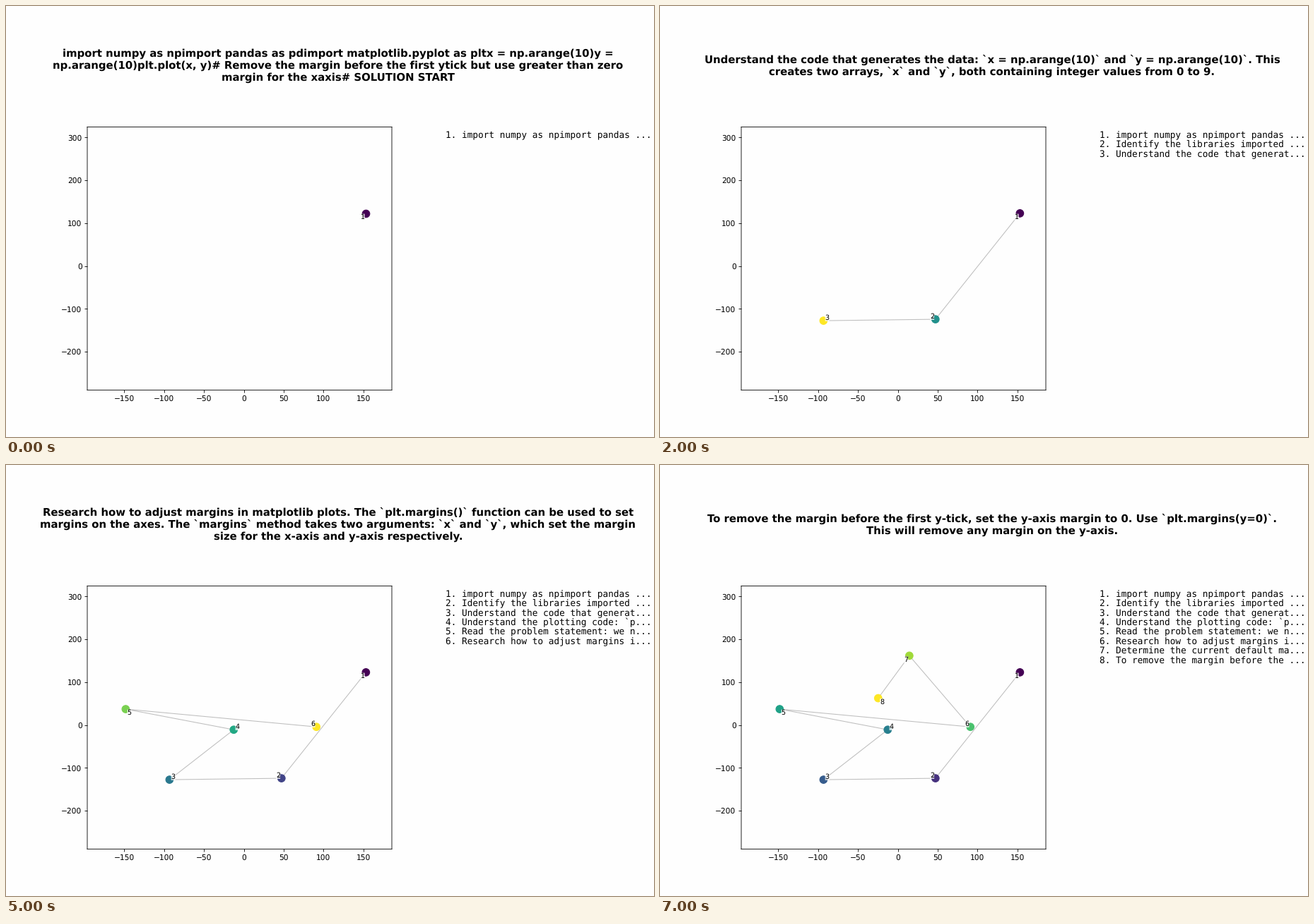
A matplotlib script that plays this animation: 917 by 611 pixels, repeating every 8000 ms.

```python
import matplotlib.pyplot as plt
import numpy as np
from matplotlib.animation import FuncAnimation

W, H, DPI = 917, 611, 76.4
EPS = 1e-6  # keeps the pixel size from rounding down
PAPER = "#fefefe"

# Soft, unsnapped lines and letters
plt.rcParams.update({"path.snap": False, "text.hinting": "none",
                     "figure.facecolor": PAPER, "axes.facecolor": PAPER})

TITLES = [
    "import numpy as npimport pandas as pdimport matplotlib.pyplot as pltx = np.arange(10)y =\n"
    "np.arange(10)plt.plot(x, y)# Remove the margin before the first ytick but use greater than zero\n"
    "margin for the xaxis# SOLUTION START",
    "Identify the libraries imported in the code. The code imports numpy as np, pandas as pd, and\n"
    "matplotlib.pyplot as plt. These are commonly used libraries for numerical and data manipulation and\n"
    "visualization in Python.",
    "Understand the code that generates the data: `x = np.arange(10)` and `y = np.arange(10)`. This\n"
    "creates two arrays, `x` and `y`, both containing integer values from 0 to 9.",
    "Understand the plotting code: `plt.plot(x, y)`. This line of code plots the values of `x`\n"
    "on the x-axis and the values of `y` on the y-axis.",
    "Read the problem statement: we need to remove the margin before the first y-tick but ensure there is\n"
    "a greater than zero margin for the x-axis.",
    "Research how to adjust margins in matplotlib plots. The `plt.margins()` function can be used to set\n"
    "margins on the axes. The `margins` method takes two arguments: `x` and `y`, which set the margin\n"
    "size for the x-axis and y-axis respectively.",
    "Determine the current default margins. By default, matplotlib adds a small margin to both sides\n"
    "of the x-axis and the y-axis.",
    "To remove the margin before the first y-tick, set the y-axis margin to 0. Use `plt.margins(y=0)`.\n"
    "This will remove any margin on the y-axis.",
]
TITLE_MID, TITLE_STEP = 88.9, 17
LIST_X, LIST_TOP, LIST_STEP = 621.8, 187, 13.43

NODES = np.array([(153.2, 123), (47.2, -124.4), (-93.3, -127.7), (-12.7, -11),
                  (-148.3, 37.1), (91, -4.4), (14.4, 161.8), (-24.7, 62.6)])

# Direction in which each number is pushed away from its node (right, down)
SIDES = [(-1, 1), (-1, -1), (1, -1), (1, -1), (1, 1), (-1, -1), (-1, 1), (1, 1)]

fig = plt.figure(figsize=((W + EPS) / DPI, (H + EPS) / DPI), dpi=DPI)
left, right, top, bottom = 115, 546, 171.5, 544.4
ax = fig.add_axes([left / W, 1 - bottom / H, (right - left) / W, (bottom - top) / H])
ax.set_xlim(-196.5, 185.7)
ax.set_ylim(-289.6, 324.6)
ax.set_xticks(range(-150, 151, 50))
ax.set_yticks(range(-200, 301, 100))

path, = ax.plot([], [], color="gray", alpha=0.5, lw=1, zorder=1)
dots = ax.scatter([], [], s=100, zorder=2)
title = [fig.text(0.5125, 0, "", size=14, weight="bold", ha="center") for _ in range(3)]


def number(i):
    right, down = SIDES[i]
    shift = np.array([5 * right + 0.3, -4.8 * down - 3.5]) * 72 / DPI
    return ax.annotate(str(i + 1), NODES[i], xytext=shift, textcoords="offset points",
                       size=9, ha="center", va="baseline", zorder=3,
                       bbox=dict(boxstyle="square,pad=0", fc=PAPER, ec="none", alpha=0.75))


def entry(i):
    text = TITLES[i].replace("\n", " ")[:32]
    return fig.text(LIST_X / W, 1 - (LIST_TOP + LIST_STEP * i) / H, f"{i + 1}. {text}...",
                    size=12, family="DejaVu Sans Mono")


def set_title(text):
    lines = text.split("\n")
    first = TITLE_MID - TITLE_STEP * (len(lines) - 1) / 2
    for k, row in enumerate(title):
        row.set_text(lines[k] if k < len(lines) else "")
        row.set_y(1 - (first + TITLE_STEP * k) / H)


numbers = [number(i) for i in range(len(NODES))]
entries = [entry(i) for i in range(len(NODES))]


def update(step):
    count = step + 1
    set_title(TITLES[step])
    path.set_data(*NODES[:count].T)
    dots.set_offsets(NODES[:count])
    dots.set_color(plt.cm.viridis(np.linspace(0, 1, count)))
    for i, (num, row) in enumerate(zip(numbers, entries)):
        num.set_visible(i < count)
        row.set_visible(i < count)
    return [*title, path, dots, *numbers, *entries]


anim = FuncAnimation(fig, update, frames=len(TITLES), interval=1000, repeat=True, repeat_delay=0)
plt.show()
```
